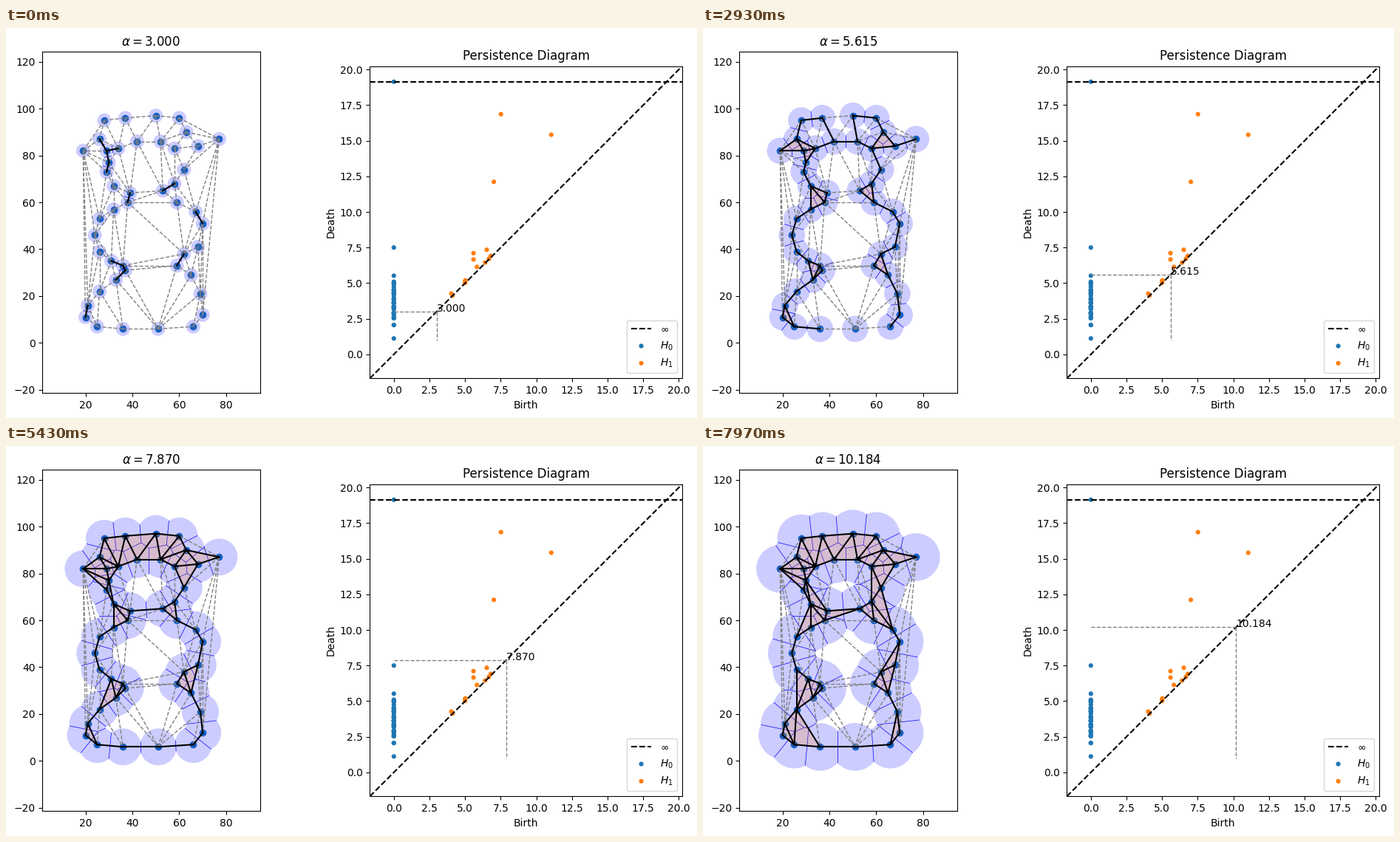
Recreate the animation shown at these times as a matplotlib script. Size 935 by 528 pixels, loop 8000 ms.

```python
import numpy as np
import matplotlib.pyplot as plt
from matplotlib.animation import FuncAnimation
from matplotlib.collections import LineCollection, PolyCollection
from matplotlib.patches import PathPatch
from matplotlib.path import Path
from matplotlib.ticker import MultipleLocator
from matplotlib.tri import Triangulation

W, H, DPI = 935, 528, 100
FRAMES, LOOP_MS = 240, 8000
RADII = np.linspace(3, 18, 500)[:FRAMES]

PTS = np.array([
    (28, 95), (37, 96), (50, 97), (60, 96), (63, 90), (68, 84), (77, 87),
    (58, 83), (52, 86), (42, 86), (34, 83), (26, 87), (29, 82), (19, 82),
    (30, 77), (29, 73), (32, 67), (39, 64), (38, 60), (32, 57), (26, 53),
    (24, 46), (26, 39), (31, 35), (36, 33), (37, 31), (33, 27), (26, 22),
    (21, 16), (20, 11), (25, 7), (36, 6), (51, 6), (66, 7), (70, 12),
    (69, 21), (65, 29), (59, 33), (62, 38), (68, 41), (70, 51), (67, 56),
    (59, 60), (58, 68), (53, 65), (62, 74)], float)


def circumcenter(a, b, c):
    m = 2 * np.array([b - a, c - a])
    return a + np.linalg.solve(m, [(b - a) @ (b - a), (c - a) @ (c - a)])


def alpha_complex(pts):
    """Delaunay edges and triangles with filtration values and dual segments."""
    tris = [tuple(sorted(map(int, t))) for t in Triangulation(*pts.T).triangles]
    centers = [circumcenter(*pts[list(t)]) for t in tris]
    tri_val = [np.hypot(*(c - pts[t[0]])) for t, c in zip(tris, centers)]
    cofaces = {}
    for k, (a, b, c) in enumerate(tris):
        for edge, opp in (((a, b), c), ((a, c), b), ((b, c), a)):
            cofaces.setdefault(edge, []).append((k, opp))

    edges = sorted(cofaces)
    edge_val, duals = [], []
    for i, j in edges:
        mid = (pts[i] + pts[j]) / 2
        d = pts[j] - pts[i]
        half = np.hypot(*d) / 2
        u = np.array([-d[1], d[0]]) / (2 * half)
        near = cofaces[i, j]
        inside = any(np.hypot(*(pts[o] - mid)) < half - 1e-9 for _, o in near)
        edge_val.append(min(tri_val[k] for k, _ in near) if inside else half)
        span = [(centers[k] - mid) @ u for k, _ in near]
        if len(span) == 1:
            span.append(-np.sign((pts[near[0][1]] - mid) @ u) * np.inf)
        duals.append((mid, u, half, min(span), max(span)))
    return edges, np.array(edge_val), tris, np.array(tri_val), duals


def persistence(n, edges, edge_val, tris, tri_val):
    """Birth/death pairs in dimensions 0 and 1 by column reduction."""
    cells = [(0.0, 1, (i,)) for i in range(n)]
    cells += [(v, 2, e) for e, v in zip(edges, edge_val)]
    cells += [(v, 3, t) for t, v in zip(tris, tri_val)]
    cells.sort()
    index = {c[2]: k for k, c in enumerate(cells)}
    columns, pairs = {}, ([], [])
    for value, size, cell in cells:
        if size == 1:
            continue
        col = {index[cell[:k] + cell[k + 1:]] for k in range(size)}
        while col and max(col) in columns:
            col ^= columns[max(col)]
        if col:
            low = max(col)
            columns[low] = col
            birth = cells[low][0]
            if value > birth + 1e-9:
                pairs[size - 2].append((birth, value))
    return [np.array(p) for p in pairs]


edges, edge_val, tris, tri_val, duals = alpha_complex(PTS)
H0, H1 = persistence(len(PTS), edges, edge_val, tris, tri_val)
edge_segs = PTS[np.array(edges)]
tri_polys = PTS[np.array(tris)]

fig = plt.figure(figsize=(W / DPI, H / DPI), dpi=DPI, facecolor="white")


def add_axes(cx, w, h):
    """Axes centred at cx, sharing one horizontal centre line, in pixels."""
    return fig.add_axes([(cx - w / 2) / W, (265 - h / 2) / H, w / W, h / H])


# Point cloud panel
lo, hi = PTS.min(axis=0), PTS.max(axis=0)
pad = 0.3 * (hi - lo)
cloud = add_axes(196.36, 462 * (hi - lo)[0] / (hi - lo)[1], 462)
cloud.set_xlim(lo[0] - pad[0], hi[0] + pad[0])
cloud.set_ylim(lo[1] - pad[1], hi[1] + pad[1])
cloud.xaxis.set_major_locator(MultipleLocator(20))
cloud.yaxis.set_major_locator(MultipleLocator(20))
cloud.scatter(*PTS.T, color="C0", zorder=0)

balls = cloud.add_patch(PathPatch(Path.circle(PTS[0], 1), fc="blue", ec="none",
                                  lw=0, alpha=0.2, zorder=0.5))
walls = cloud.add_collection(
    LineCollection([], colors="blue", linewidths=0.5, zorder=0.7),
    autolim=False)
faces = cloud.add_collection(
    PolyCollection([], facecolors="C1", edgecolors="none", alpha=0.2,
                   zorder=1), autolim=False)
waiting = cloud.add_collection(
    LineCollection([], colors="gray", linewidths=1, linestyles="--", zorder=2),
    autolim=False)
joined = cloud.add_collection(
    LineCollection([], colors="black", linewidths=1.5, capstyle="projecting",
                   zorder=2.1), autolim=False)
title = cloud.set_title("")

# Persistence panel
top = max(H0.max(), H1.max())
down, up = -0.1 * top, 1.2 * top
inf_y = down + 0.95 * (up - down)
diagram = add_axes(703.64, 422.73, 422.73)
diagram.plot([down, up], [down, up], "k--")
diagram.plot([down, up], [inf_y, inf_y], "k--", label=r"$\infty$")
H0 = np.vstack([H0, (0, inf_y)])
for k, dgm in enumerate((H0, H1)):
    diagram.scatter(*dgm.T, s=20, color=f"C{k}", edgecolor="none",
                    label=f"$H_{k}$")
diagram.set_xlim(down, up)
diagram.set_ylim(down, up)
diagram.xaxis.set_major_locator(MultipleLocator(2.5))
diagram.yaxis.set_major_locator(MultipleLocator(2.5))
diagram.set_xlabel("Birth")
diagram.set_ylabel("Death")
diagram.set_title("Persistence Diagram")
diagram.legend(loc="lower right")
across, = diagram.plot([], [], "--", color="gray", lw=1)
drop, = diagram.plot([], [], "--", color="gray", lw=1)
readout = diagram.text(0, 0, "")


def wall_segments(r):
    segs = []
    for mid, u, half, a, b in duals:
        if r > half:
            reach = np.sqrt(r * r - half * half)
            a, b = max(a, -reach), min(b, reach)
            if a < b:
                segs.append([mid + a * u, mid + b * u])
    return segs


def update(frame):
    r = RADII[frame]
    balls.set_path(Path.make_compound_path(*[Path.circle(p, r) for p in PTS]))
    walls.set_segments(wall_segments(r))
    faces.set_verts(list(tri_polys[tri_val < r]))
    waiting.set_segments(list(edge_segs[edge_val >= r]))
    joined.set_segments(list(edge_segs[edge_val < r]))
    title.set_text(rf"$\alpha = {r:.3f}$")
    across.set_data([0, r], [r, r])
    drop.set_data([r, r], [r, 1])
    readout.set_position((r, r))
    readout.set_text(f"{r:.3f}")
    return balls, walls, faces, waiting, joined, title, across, drop, readout


anim = FuncAnimation(fig, update, frames=FRAMES, interval=LOOP_MS / FRAMES,
                     repeat=True, repeat_delay=0, blit=False)
plt.show()
```
